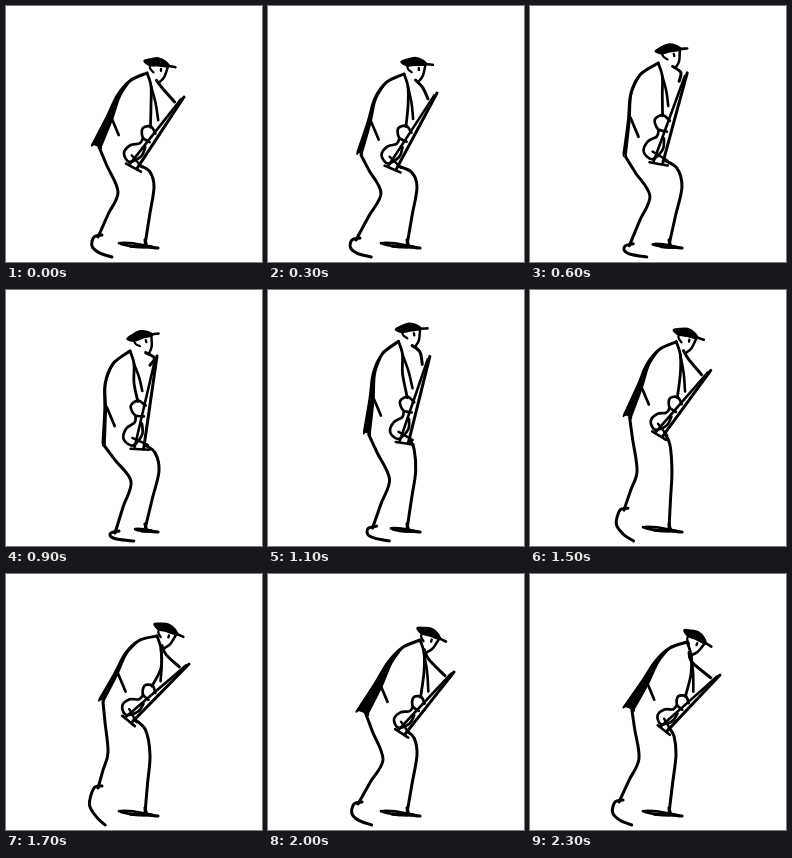
Animation of 256x256 px, one loop 2400 ms. Source, as an HTML page with a canvas:

```html
<!DOCTYPE html>
<html lang="en">
<head>
<meta charset="utf-8">
<title>Saxophone player</title>
<style>
html, body { margin: 0; width: 100%; height: 100%; overflow: hidden; background: #fff; }
canvas { display: block; width: 100vw; height: 100vh; }
</style>
</head>
<body>
<canvas id="stage" width="256" height="256"></canvas>
<script>
const ctx = document.getElementById('stage').getContext('2d');
const LOOP = 2400, STEP = 100;

// Key joints only; every other point of the figure follows from them.
const poses = [
  { t: 0, neck: [141, 67], hem: [87, 138], tip: [178, 91], bell: [131, 161], knee: [112, 148], heel: [92, 231], flare: [8] },
  { t: 300, neck: [136, 68], hem: [90, 146], tip: [169, 87], bell: [128, 162], knee: [113, 149], heel: [88, 234], flare: [4] },
  { t: 900, neck: [124, 61], hem: [97, 153], tip: [151, 66], bell: [137, 157], knee: [125, 153], heel: [109, 243], flare: [2] },
  { t: 1300, neck: [140, 54], hem: [95, 133], tip: [176, 81], bell: [140, 151], knee: [115, 142], heel: [97, 230], flare: [9] },
  { t: 1700, neck: [151, 62], hem: [94, 125], tip: [183, 90], bell: [126, 147], knee: [102, 144], heel: [92, 214], flare: [4] },
  { t: 2000, neck: [152, 66], hem: [90, 136], tip: [186, 98], bell: [137, 159], knee: [115, 149], heel: [90, 230], flare: [10] },
  { t: 2300, neck: [157, 68], hem: [95, 132], tip: [190, 101], bell: [137, 156], knee: [109, 146], heel: [89, 228], flare: [9] }
];   // knee holds the x of the back and the front knee

function poseNear(i) {
  const n = poses.length, turn = Math.floor(i / n), p = poses[i - turn * n];
  return { ...p, t: p.t + turn * LOOP };
}

// Smooth cyclic blend; the longer a move lasts, the higher the body rises on the way.
function jointsAt(t) {
  const seg = poses.findLastIndex(p => p.t <= t);
  const [p, a, b, n] = [-1, 0, 1, 2].map(k => poseNear(seg + k));
  const d = b.t - a.t, u = (t - a.t) / d, h = u * u * (3 - 2 * u);
  const blend = key => a[key].map((x, i) => {
    const m0 = (b[key][i] - p[key][i]) / (b.t - p.t) * d;
    const m1 = (n[key][i] - x) / (n.t - a.t) * d;
    return x + (b[key][i] - x) * h + u * (1 - u) * ((1 - u) * m0 - u * m1);
  });
  const j = {};
  for (const key in a) if (key !== 't') j[key] = blend(key);
  const rise = d / 75 * Math.sin(Math.PI * u) ** 2;
  j.neck[1] -= rise;
  j.tip[1] -= rise;
  j.hem[1] -= rise / 2;
  j.bell[1] -= rise / 2;
  return j;
}

const add = ([x, y], dx, dy) => [x + dx, y + dy];
const mix = (a, b, kx, ky = kx) => [a[0] + (b[0] - a[0]) * kx, a[1] + (b[1] - a[1]) * ky];

// Local axes: s runs from a to b, w to the right of it, both in units of the length.
const axes = (a, b) => (...pts) => pts.map(([s, w]) => [
  a[0] + (b[0] - a[0]) * s - (b[1] - a[1]) * w,
  a[1] + (b[1] - a[1]) * s + (b[0] - a[0]) * w
]);

function trace(pts, closed) {
  const n = pts.length;
  const at = i => closed ? pts[(i + n) % n] : pts[Math.min(n - 1, Math.max(0, i))];
  ctx.beginPath();
  ctx.moveTo(...pts[0]);
  for (let i = 0; i < (closed ? n : n - 1); i++) {
    const [p, a, b, q] = [at(i - 1), at(i), at(i + 1), at(i + 2)];
    ctx.bezierCurveTo(a[0] + (b[0] - p[0]) / 6, a[1] + (b[1] - p[1]) / 6,
      b[0] - (q[0] - a[0]) / 6, b[1] - (q[1] - a[1]) / 6, b[0], b[1]);
  }
}

function line(pts, width = 3, closed = false) {
  trace(pts, closed);
  ctx.lineWidth = width;
  ctx.stroke();
}

function blob(pts) {
  line(pts, 1.6, true);
  ctx.fill();
}

function drawHead({ neck }, sax) {
  // The head bows as the neck moves forward.
  const tilt = (neck[0] - 132) * 1.25 * Math.PI / 180;
  const back = add(neck, -3, -12);
  const at = axes(back, add(back, 32 * Math.cos(tilt), 32 * Math.sin(tilt)));
  blob(at([0, 0], [.18, -.1], [.42, -.18], [.66, -.12], [.8, .02], [.45, .06], [.2, .1]));
  line(at([.1, .02], [.6, 0], [1, 0]), 2.6);
  line(at([.57, .14], [.58, .2]), 2.4);
  line(at([.2, .08], [.24, .2], [.36, .29]), 2.2);
  line(at([.77, 0], [.72, .36], [.6, .56]), 2.5);
  const [lips, throat] = at([.5, .52], [.74, .73]);
  line([lips, throat, ...sax([.11, .06])]);
}

function drawCoat({ neck, hem, flare: [flare] }, sax) {
  const at = axes(neck, hem);
  const bow = 1.45 - .06 * flare;   // a swinging coat pulls the back straight
  const back = at([0, 0], [.18, .1 * bow], [.4, .115 * bow], [.66, .06 * bow], [1, 0]);
  const lining = back.slice(1).map((p, i) => add(p, flare * i / 3, flare * i / 8)).reverse();
  line(back);
  blob([...back.slice(1), hem, lining[0], ...lining]);

  const [elbow] = at([.63, .08 - .006 * flare]);
  line([elbow, add(elbow, 8, 19)], 2.7);

  const chest = add(neck, 4, 13);
  const [wrist, hook] = sax([.52, .13], [.4, .1]);
  line([neck, chest, add(neck, 4, 32), wrist], 2.8);
  line([chest, add(mix(chest, hook, .5), 1, 0), hook], 2.6);
}

function drawSax(sax) {
  line(sax([0, 0], [1.02, -.01]));
  line(sax([.04, .015], [1.02, .09]), 2.6);
  line(sax([.55, .04], [.51, .13], [.58, .2], [.67, .14], [.67, .04]), 2.7);
  line(sax([.68, .13], [.75, .13], [.83, .21], [.95, .22], [1, .11], [.87, .03], [.75, .05]), 2.7);
  line(sax([1.04, .13], [1.02, -.07]), 2.6);
  line(sax([.92, .13], [.97, -.05]), 2.4);
}

function drawLegs({ neck, hem, bell, knee, heel, flare: [flare] }) {
  const ankle = [139, 239], hip = add(bell, 2, -2), front = [knee[1], 181];
  line([hip, mix(hip, front, .72, .3), front, mix(front, ankle, .5), ankle]);

  // A raised heel folds the leg and lets the foot hang.
  const seat = add(hem, flare * .75, 3), back = [knee[0], 186 + .45 * (heel[1] - 231)];
  line([seat, mix(seat, back, .4), back, mix(back, heel, .5), heel]);
  const drop = 251 - heel[1], sole = -3 - .15 * drop;
  line([add(heel, 4, -2), add(heel, -4, 0), add(heel, sole, drop * .45),
    add(heel, sole + 7, drop * .78), add(heel, 22 - .4 * drop, drop)]);

  // The front shoe foreshortens as he straightens up.
  const toe = [152, 242], length = Math.min(39, (neck[0] - hem[0]) * .85);
  const shoe = axes(toe, add(toe, -length, -length / 8));
  line(shoe([1, 0], [.65, -.04], [.25, 0], [.65, .04]), 2.7, true);
  line(shoe([.7, -.04], [.3, -.01], [0, 0]), 3.2);
  line([add(ankle, 0, -5), add(ankle, 2, 1), add(ankle, 7, 2)], 3.2);
}

function draw() {
  const j = jointsAt(Math.floor(performance.now() % LOOP / STEP) * STEP);
  const sax = axes(j.tip, j.bell);
  ctx.fillStyle = '#fff';
  ctx.fillRect(0, 0, 256, 256);
  ctx.fillStyle = ctx.strokeStyle = '#000';
  ctx.lineCap = ctx.lineJoin = 'round';
  drawLegs(j);
  drawCoat(j, sax);
  drawSax(sax);
  drawHead(j, sax);
  requestAnimationFrame(draw);
}
draw();
</script>
</body>
</html>
```
